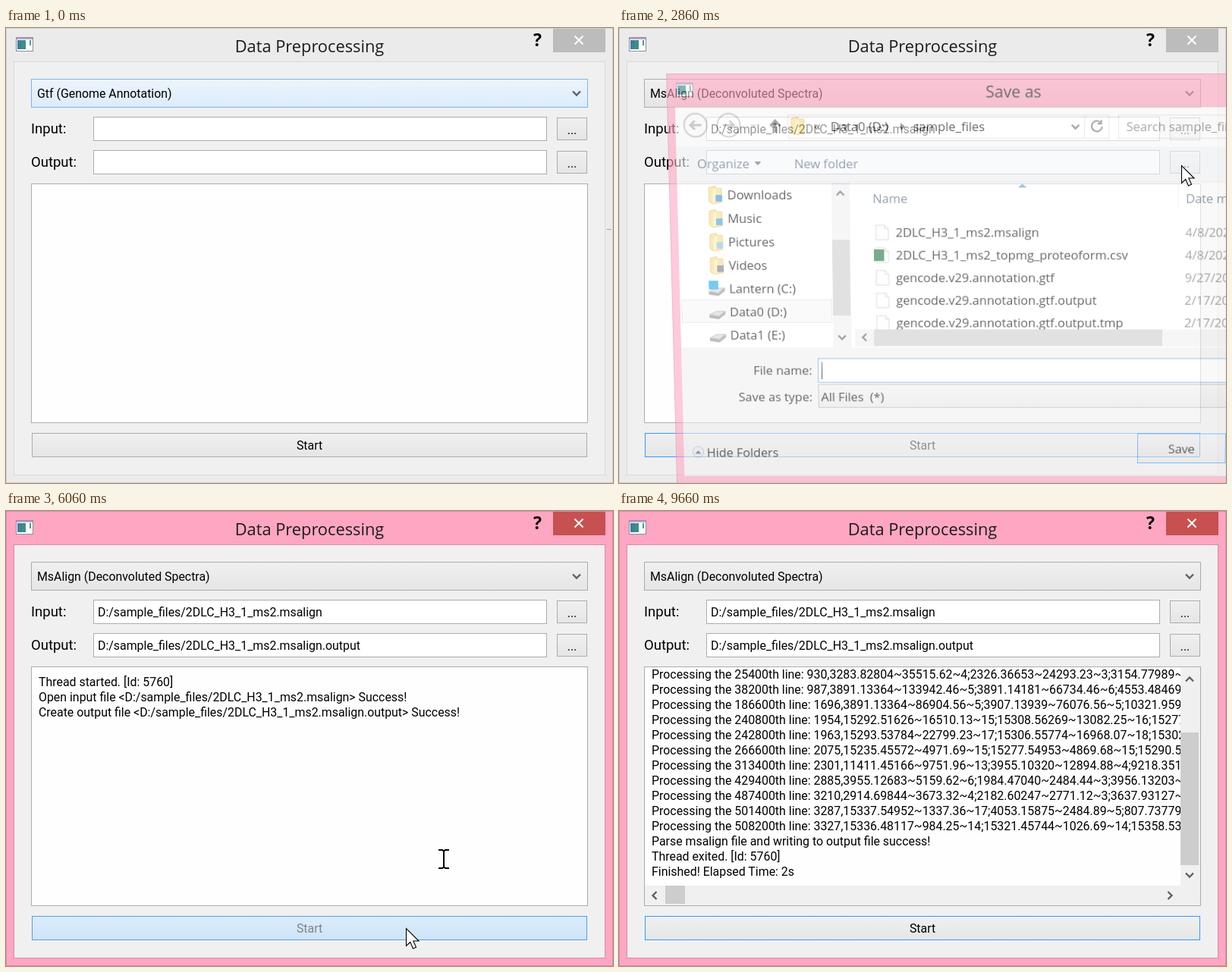
Write an HTML page that moves like this. It is 800 px wide and 600 px high and loops after 9.73 s.

```html
<!DOCTYPE html>
<html lang="en">
<head>
<meta charset="utf-8">
<title>Data Preprocessing</title>
<style>
html, body { margin: 0; width: 100%; height: 100%; overflow: hidden; }
#stage { position: relative; width: 800px; height: 600px; overflow: hidden; background: #ebebeb; }
#stage > svg { position: absolute; left: 0; top: 0; }
.dialog { transform-origin: 517px 225px; }
text { white-space: pre; fill: #000; }
.r { font: 15.9px Roboto, "Noto Sans", sans-serif; }
.l { font: 18.5px Roboto, "Noto Sans", sans-serif; }
.o { font: 17px "Open Sans", "Noto Sans", sans-serif; }
.h { font: 21.8px "Open Sans", "Noto Sans", sans-serif; fill: #1c1c1c; }
.m { text-anchor: middle; }
.e { text-anchor: end; }
.dim { fill: #6d6d6d; }
.head { fill: #4c607a; }
.chev { fill: none; stroke: #606060; stroke-width: 2.4; }
</style>
</head>
<body>
<div id="stage"></div>
<script>
const LOOP = 9730, STEP = 200 / 3;
const PINK = '#ffa6c2', GREY = '#acacac', BLUE = '#3399ff', HOT = '#7eb4ea';

// ---------- drawing helpers ----------
const tx = (x, y, s, cls = 'r', id = '') =>
  `<text ${id && `id="${id}"`} x="${x}" y="${y + (cls[0] === 'h' ? 8 : 6)}" class="${cls}">${s.replace(/</g, '&lt;')}</text>`;
const fill = (x, y, w, h, f, id = '') =>
  `<rect ${id && `id="${id}"`} x="${x}" y="${y}" width="${w}" height="${h}" fill="${f}"/>`;
const box = (x, y, w, h, f, s, id = '') =>
  `<rect ${id && `id="${id}"`} x="${x + .5}" y="${y + .5}" width="${w - 1}" height="${h - 1}" fill="${f}" stroke="${s}"/>`;
const path = (d, extra) => `<path d="${d}" ${extra}/>`;
const TURN = { down: 0, left: 90, up: 180, right: 270 };
const chev = (x, y, dir, id = '') =>
  `<path ${id && `id="${id}"`} class="chev" d="M-5-2.5L0 2.5 5-2.5" transform="translate(${x} ${y}) rotate(${TURN[dir]})"/>`;
const grad = (id, a, b) =>
  `<linearGradient id="${id}" x2="0" y2="1"><stop stop-color="${a}"/><stop offset="1" stop-color="${b}"/></linearGradient>`;
const svg = (id, w, h, body, cls = '') =>
  `<svg id="${id}" class="${cls}" width="${w}" height="${h}">${body}</svg>`;

const appIcon = (x, y) =>
  box(x, y, 23, 19, '#fff', '#8d8d9a') + fill(x + 1, y + 1, 21, 2, '#b9a3cf') +
  fill(x + 2, y + 4, 11, 12, '#3d8f86') + fill(x + 2, y + 4, 5, 12, '#3f7f9f') + fill(x + 18, y + 4, 2, 7, '#4aa08a');
const folder = (x, y, accent) =>
  path(`M${x} ${y - 10}l9-2v3h8v19l-12 2-5-3z`, 'fill="#f6dc8c" stroke="#dcb95a"') +
  path(`M${x + 5} ${y - 6}l5-3v18l-5 3z`, 'fill="#fbecb5"') +
  (accent ? fill(x + 9, y, 9, 9, accent) : '');
const drive = (x, y) =>
  path(`M${x} ${y + 2}l10-5h12l-9 6z`, 'fill="#d9d9d9" stroke="#a5a5a5"') +
  path(`M${x} ${y + 2}l13 2v4l-13-2zM${x + 13} ${y + 4}l9-7v4l-9 7z`, 'fill="#8f8f8f"');
const page = (x, y) => path(`M${x} ${y - 10}h12l5 5v15h-17zM${x + 12} ${y - 10}v5h5`, 'fill="#fdfdfd" stroke="#c6c6c6"');

// ---------- main window ----------
const ROWS = [
  'Thread started. [Id: 5760]',
  'Open input file <D:/sample_files/2DLC_H3_1_ms2.msalign> Success!',
  'Create output file <D:/sample_files/2DLC_H3_1_ms2.msalign.output> Success!',
  ...[
    '12600th line: 871,2914.70512~41877.35~4;2182.60318~20416.77~3;3154.77102~',
    '25400th line: 930,3283.82804~35515.62~4;2326.36653~24293.23~3;3154.77989~18',
    '38200th line: 987,3891.13364~133942.46~5;3891.14181~66734.46~6;4553.48469~31',
    '186600th line: 1696,3891.13364~86904.56~5;3907.13939~76076.56~5;10321.95917~',
    '240800th line: 1954,15292.51626~16510.13~15;15308.56269~13082.25~16;15277.52',
    '242800th line: 1963,15293.53784~22799.23~17;15306.55774~16968.07~18;15302.51',
    '266600th line: 2075,15235.45572~4971.69~15;15277.54953~4869.68~15;15290.5318',
    '313400th line: 2301,11411.45166~9751.96~13;3955.10320~12894.88~4;9218.35126~',
    '429400th line: 2885,3955.12683~5159.62~6;1984.47040~2484.44~3;3956.13203~415',
    '487400th line: 3210,2914.69844~3673.32~4;2182.60247~2771.12~3;3637.93127~208',
    '501400th line: 3287,15337.54952~1337.36~17;4053.15875~2484.89~5;807.73779~11',
    '508200th line: 3327,15336.48117~984.25~14;15321.45744~1026.69~14;15358.53107'
  ].map(s => 'Processing the ' + s),
  'Parse msalign file and writing to output file success!',
  'Thread exited. [Id: 5760]',
  'Finished! Elapsed Time: 2s'
];
const ROW_TIMES = [6000, 6000, 6000, 6130, 6200, 6200, 6460, 6600, 6660, 6730,
  6930, 7130, 7200, 7260, 7260, 7930, 7930, 7930];

const dots = (y, id) => box(726, y, 40, 30, 'url(#norm)', GREY) + box(726, y, 40, 30, 'url(#hot)', HOT, id) +
  tx(746, y + 16, '...', 'r m');

const main = svg('main', 800, 600,
  `<defs>${grad('norm', '#f0f0f0', '#e5e5e5')}${grad('hot', '#ecf4fc', '#dcecfc')}${grad('down', '#daecfc', '#cfe4f8')}</defs>` +
  box(0, 0, 800, 600, '#ebebeb', '#cfcfcf', 'frame') +
  box(10, 44, 780, 546, '#f0f0f0', '#d9d9d9', 'client') +
  appIcon(13, 12) + tx(400, 24, 'Data Preprocessing', 'h m') +
  '<text x="700.5" y="24" class="m" style="font:bold 23px \'Open Sans\',sans-serif">?</text>' +
  fill(721, 1, 69, 31, '#bcbcbc', 'close') +
  path('M749.5 10.5l11 11m0-11l-11 11', 'stroke="#fff" stroke-width="2"') +
  box(33, 67, 734, 38, 'url(#norm)', GREY) + box(33, 67, 734, 38, 'url(#hot)', HOT, 'comboHot') +
  tx(41, 86, '', 'r', 'kind') + chev(752, 86, 'down') +
  tx(33, 133, 'Input:', 'l') + tx(33, 177, 'Output:', 'l') +
  box(115, 117, 598, 32, '#fff', '#abadb3') + box(115, 161, 598, 32, '#fff', '#abadb3') +
  tx(121, 133, 'D:/sample_files/2DLC_H3_1_ms2.msalign', 'r', 'inPath') +
  tx(121, 177, 'D:/sample_files/2DLC_H3_1_ms2.msalign.output', 'r', 'outPath') +
  dots(118, 'inHot') + dots(162, 'outHot') +
  box(33, 205, 734, 316, '#fefefe', '#abadb3') +
  `<svg id="view" x="34" y="206" width="732" height="314"><g id="log">${
    ROWS.map((s, i) => tx(9, 19 + 20 * i, s, 'r', 'row' + i)).join('')}</g></svg>` +
  `<g id="hbar">${fill(34, 494, 732, 26, '#f0f0f0')}${fill(61, 494, 26, 24, '#cdcdcd')}${chev(47, 507, 'left')}${chev(726, 507, 'right', 'hEnd')}</g>` +
  `<g id="vbar">${fill(740, 206, 26, 288, '#f0f0f0')}${fill(740, 291, 24, 176, '#cdcdcd', 'vThumb')}${chev(752, 222, 'up')}${chev(752, 480, 'down')}</g>` +
  box(34, 534, 732, 32, 'url(#norm)', GREY, 'start') + box(34, 534, 732, 32, 'url(#hot)', HOT, 'startHot') +
  tx(400, 550, 'Start', 'r m', 'startText') +
  `<g id="popup">${box(33, 104, 734, 46, '#fff', '#000')}${fill(34, 105, 732, 22, BLUE, 'pick')}${
    tx(41, 116, 'Gtf (Genome Annotation)', 'r', 'opt0')}${tx(41, 138, 'MsAlign (Deconvoluted Spectra)', 'r', 'opt1')}</g>` +
  path('M792 265.5h6', 'id="specks" stroke="#555" stroke-dasharray="1 1"'));

// ---------- file dialogs ----------
const FILES = [
  ['2DLC_H3_1_ms2.msalign', '4/8/2020'],
  ['2DLC_H3_1_ms2_topmg_proteoform.csv', '4/8/2020'],
  ['gencode.v29.annotation.gtf', '9/27/2018'],
  ['gencode.v29.annotation.gtf.output', '2/17/2020'],
  ['gencode.v29.annotation.gtf.output.tmp', '2/17/2020']
];
const PLACES = ['Desktop', 'Documents', 'Downloads', 'Music', 'Pictures', 'Videos', 'Lantern (C:)', 'Data0 (D:)', 'Data1 (E:)'];
const TINTS = ['#3f8fd0', '#b9cfdf', '#3a95dd', '#3f9fd8', '#8fc3d8', '#7a7a88'];

function place(i, y) {
  const icon = i < 6 ? folder(105, y, TINTS[i])
    : drive(102, y + 2) + (i === 6 ? fill(102, y - 11, 13, 12, '#1ba8e8') : '');
  return icon + tx(130, y, PLACES[i], 'o');
}

// dx widens the left pane, low is the lower edge of the panes
function dialog(id, title, dx, low, first, thumb, foot) {
  const ring = (x, d) => `<circle cx="${x}" cy="126" r="15.5" fill="#fff" stroke="#b9b9b9" stroke-width="2"/>` +
    path(d, 'fill="none" stroke="#b0b0b0" stroke-width="3"');
  const sel = 220 + 32 * (7 - first);
  return svg(id, 1000, 640,
    box(51, 57, 932, 563, PINK, '#dc8ba6') + fill(62, 102, 910, 507, '#f0f0f0') +
    appIcon(64, 69) + tx(520, 81, title, 'h m') +
    fill(62, 102, 910, 53, '#fff') + fill(62, 155, 910, 48, '#f5f7fa') +
    fill(62, 203, 910, low - 203, '#fff') + fill(62, 202, 910, 1, '#e3e8ee') +
    ring(89, 'M97 126h-15m6-6l-6 6 6 6') + ring(134, 'M126 126h15m-6-6l6 6-6 6') +
    path('M163 125h9l-4.5 5z', 'fill="#c9c9c9"') +
    path('M197 136v-16m-6.5 7l6.5-7 6.5 7', 'fill="none" stroke="#5f6468" stroke-width="3"') +
    box(214, 112, 436, 32, '#fff', '#d9d9d9') + folder(219, 127) +
    tx(250, 127, '«', 'o') + tx(272, 128, 'Data0 (D:)', 'o') + path('M367 123v10l6-5z', 'fill="#555"') +
    tx(384, 128, 'sample_files', 'o') + chev(604, 128, 'down') + fill(616, 113, 1, 30, '#d9d9d9') +
    path('M638.5 123a7 7 0 1 0 1.5 5m-1-9v5h-5', 'fill="none" stroke="#6d6d6d" stroke-width="2"') +
    box(662, 112, 310, 32, '#fff', '#d9d9d9') + tx(673, 128, 'Search sample_files', 'o dim') +
    tx(90, 178, 'Organize', 'o head') + path('M168 175h9l-4.5 5z', 'fill="#4c607a"') +
    tx(222, 178, 'New folder', 'o head') +
    box(64, sel - 17, 207 + dx, 32, '#f7f7f7', '#dedede') +
    PLACES.slice(first).map((s, i) => place(i + first, 220 + 32 * i)).join('') +
    fill(272 + dx, 203, 25, low - 203, '#f0f0f0') + fill(272 + dx, thumb[0], 24, thumb[1] - thumb[0], '#cdcdcd') +
    chev(284 + dx, 218, 'up') + chev(284 + dx, low - 14, 'down') +
    tx(328 + dx, 225, 'Name', 'o head') + path(`M${526 + dx} 210l6-5 6 5z`, 'fill="#5a9ac0"') +
    fill(744 + dx, 204, 1, 34, '#e3e8ee') + tx(755 + dx, 225, 'Date modified', 'o head') +
    box(325 + dx, 255, 600, 31, '#cbe8f6', '#26a0da', id + 'Sel') +
    FILES.map(([name, date], i) => {
      const y = 271 + 31 * i;
      return page(332 + dx, y) + (i === 1 ? fill(329 + dx, y - 8, 14, 16, '#1f7244') : '') +
        tx(359 + dx, y, name, 'o') + tx(755 + dx, y, date, 'o dim');
    }).join('') +
    fill(302 + dx, low - 25, 670, 24, '#f0f0f0') + fill(328 + dx, low - 25, 397, 23, '#cdcdcd') +
    chev(315 + dx, low - 14, 'left') +
    fill(62, low, 910, 609 - low, '#f0f0f0') + foot +
    fill(0, 0, 1, 20, '#000', id + 'Caret'), 'dialog');
}
const action = s => box(692, 549, 123, 42, 'url(#norm)', BLUE) + tx(753.5, 571, s, 'o m');

const openDlg = dialog('open', 'Select Input File', 27, 492, 0, [252, 442],
  tx(327, 527, 'File name:', 'o e') + box(335, 510, 344, 34, '#fff', '#569de5') +
  tx(340, 527, '', 'o', 'openName') + chev(665, 527, 'down') +
  box(692, 511, 270, 31, 'url(#norm)', GREY) + tx(696, 527, 'All Files  (*)', 'o') + action('Open'));
const saveDlg = dialog('save', 'Save as', 0, 429, 2, [281, 385],
  tx(242, 461, 'File name:', 'o e') + box(250, 444, 712, 34, '#fff', '#569de5') +
  tx(255, 461, '', 'o', 'saveName') +
  tx(242, 498, 'Save as type:', 'o e') + box(250, 480, 712, 33, 'url(#norm)', GREY) +
  tx(254, 498, 'All Files  (*)', 'o') +
  '<circle cx="82" cy="575" r="7.5" fill="#e8eef5" stroke="#a9b4c0"/>' + path('M78 577.5h8l-4-4.5z', 'fill="#3f5872"') +
  tx(94, 576, 'Hide Folders', 'o') + action('Save'));

const pointers = svg('pointers', 800, 600,
  path('M-7-12H-2L0-10.5 2-12H7M0-10.5V10.5M-7 12H-2L0 10.5 2 12H7', 'id="beam" fill="none" stroke="#000" stroke-width="2"') +
  path('M0 0V23L5.3 18 9 26.5 13 24.8 9.3 16.5H16.5Z', 'id="arrow" fill="#fff" stroke="#000" stroke-width="1.1"'));

document.getElementById('stage').innerHTML = main + openDlg + saveDlg + pointers;

// ---------- timing ----------
const $ = id => document.getElementById(id);
const show = (id, on) => { $(id).style.display = on ? '' : 'none'; };
const set = (id, o) => { for (const n in o) $(id).setAttribute(n, o[n]); };
const tick = ms => Math.round(ms / STEP);

const PATH = [
  [130, 180, 90], [400, 205, 136], [460, 205, 136], [930, 746.5, 137], [1400, 746.5, 137],
  [1660, 480, 270], [1760, 480, 270], [1990, 750, 568], [2130, 750, 568], [2660, 741.5, 181.5],
  [3060, 741.5, 181.5], [3530, 470, 270], [3660, 470, 270], [4060, 577, 459], [5470, 577, 459], [5870, 527.5, 550.5]
];
function pointerAt(t) {
  const i = PATH.findIndex(p => p[0] > t);
  if (i < 0) return PATH[PATH.length - 1].slice(1);
  if (!i) return PATH[0].slice(1);
  const [a, ax, ay] = PATH[i - 1], [b, bx, by] = PATH[i];
  const u = (t - a) / (b - a), s = u * u * (3 - 2 * u);
  return [ax + (bx - ax) * s, ay + (by - ay) * s];
}

// opacity and amount of tilt while a dialog comes in
const ENTER = [[.3, 1.6], [.6, 1], [.87, .4], [1, 0]];
function pose(id, k, from, to) {
  const i = k - tick(from), j = k - tick(to), on = i >= 0 && j < 1;
  show(id, on);
  if (!on) return;
  const [a, p] = j === 0 ? [.5, .6] : ENTER[Math.min(i, 3)];
  $(id).style.opacity = a;
  $(id).style.transform = p
    ? `matrix3d(1,0,0,0, 0,${1 + .006 * p},0,${5.78e-5 * p}, 0,0,1,0, 0,0,0,${1 + .0341 * p})` : 'none';
}
function entry(id, text, x, y, caret) {
  const name = $(id + 'Name');
  name.textContent = text;
  show(id + 'Caret', caret);
  if (caret) set(id + 'Caret', { x: Math.round(x + (text ? name.getComputedTextLength() : 0)), y: y - 12, height: 24 });
}

function draw(now) {
  const k = Math.floor((now % LOOP + 9) / STEP), t = k * STEP;
  const past = ms => k >= tick(ms), during = (a, b) => past(a) && !past(b);
  const active = during(130, 1130) || during(2130, 2800) || past(5130);
  const [x, y] = pointerAt(t);
  const over = (l, top, w, h) => active && past(130) && x > l && x < l + w && y > top && y < top + h;

  set('frame', active ? { fill: PINK, stroke: '#dc8ba6' } : { fill: '#ebebeb', stroke: '#cfcfcf' });
  set('client', { stroke: active ? '#dc8ba6' : '#d9d9d9' });
  set('close', { fill: active ? '#c75050' : '#bcbcbc' });
  show('specks', !past(130));

  const popup = during(130, 460), second = y > 127;
  show('popup', popup);
  set('pick', { y: second ? 127 : 105 });
  $('opt0').style.fill = second ? '#000' : '#fff';
  $('opt1').style.fill = second ? '#fff' : '#000';
  $('kind').textContent = past(460) ? 'MsAlign (Deconvoluted Spectra)' : 'Gtf (Genome Annotation)';
  show('comboHot', !past(460) || over(33, 67, 734, 38));
  show('inHot', past(460) && over(726, 118, 40, 30));
  show('outHot', over(726, 162, 40, 30));
  show('inPath', past(2130));
  show('outPath', past(5130));

  // log and its scroll bars
  const n = ROW_TIMES.filter(past).length, long = n > 3, tall = n > 13, size = n * 20 + 18;
  ROWS.forEach((s, i) => show('row' + i, i < n));
  set('view', { width: tall ? 706 : 732, height: long ? 288 : 314 });
  set('log', { transform: `translate(0 ${-Math.max(0, size - 288)})` });
  show('hbar', long);
  show('vbar', tall);
  set('hEnd', { transform: `translate(${tall ? 726 : 752} 507) rotate(${TURN.right})` });
  if (tall) {
    const h = Math.round(230 * 288 / size);
    set('vThumb', { y: 467 - h, height: h });
  }

  // start button
  const busy = during(5930, 7930);
  const glow = past(8860) ? Math.max(0, 1 - (t - 8800) / 800) : over(34, 534, 732, 32) ? 1 : 0;
  set('start', { stroke: past(130) ? BLUE : GREY });
  set('startHot', busy ? { fill: 'url(#down)', stroke: '#569de5', opacity: 1 } : { fill: 'url(#hot)', stroke: HOT, opacity: glow });
  $('startText').style.fill = during(6000, 7930) ? '#838383' : '#000';

  // dialogs
  pose('open', k, 1130, 2060);
  pose('save', k, 2800, 5130);
  show('openSel', past(1730));
  entry('open', past(1730) ? FILES[0][0] : '', 340, 527, !past(1730));
  const typed = Math.max(0, Math.min(7, Math.round((k - tick(4330)) * 7 / 8)));
  show('saveSel', during(3600, 4400));
  set('saveSel', past(4130) ? { fill: '#f7f7f7', stroke: '#dedede' } : { fill: '#cbe8f6', stroke: '#26a0da' });
  entry('save', past(3600) ? FILES[0][0] + '.output'.slice(0, typed) : '', 255, 461, !past(3600) || past(4130));

  // pointers; the text beam lingers after the arrow has left
  const field = during(3660, 5530) && y > 444;
  const rest = during(5530, 6460);
  show('beam', field || rest);
  set('beam', { transform: rest ? 'translate(577 459)' : `translate(${x} ${y})` });
  show('arrow', during(130, 8860) && !field && !(past(5200) && y < 521));
  set('arrow', { transform: `translate(${x} ${y})` });
}

function loop() {
  draw(performance.now());
  requestAnimationFrame(loop);
}
loop();
</script>
</body>
</html>
```
